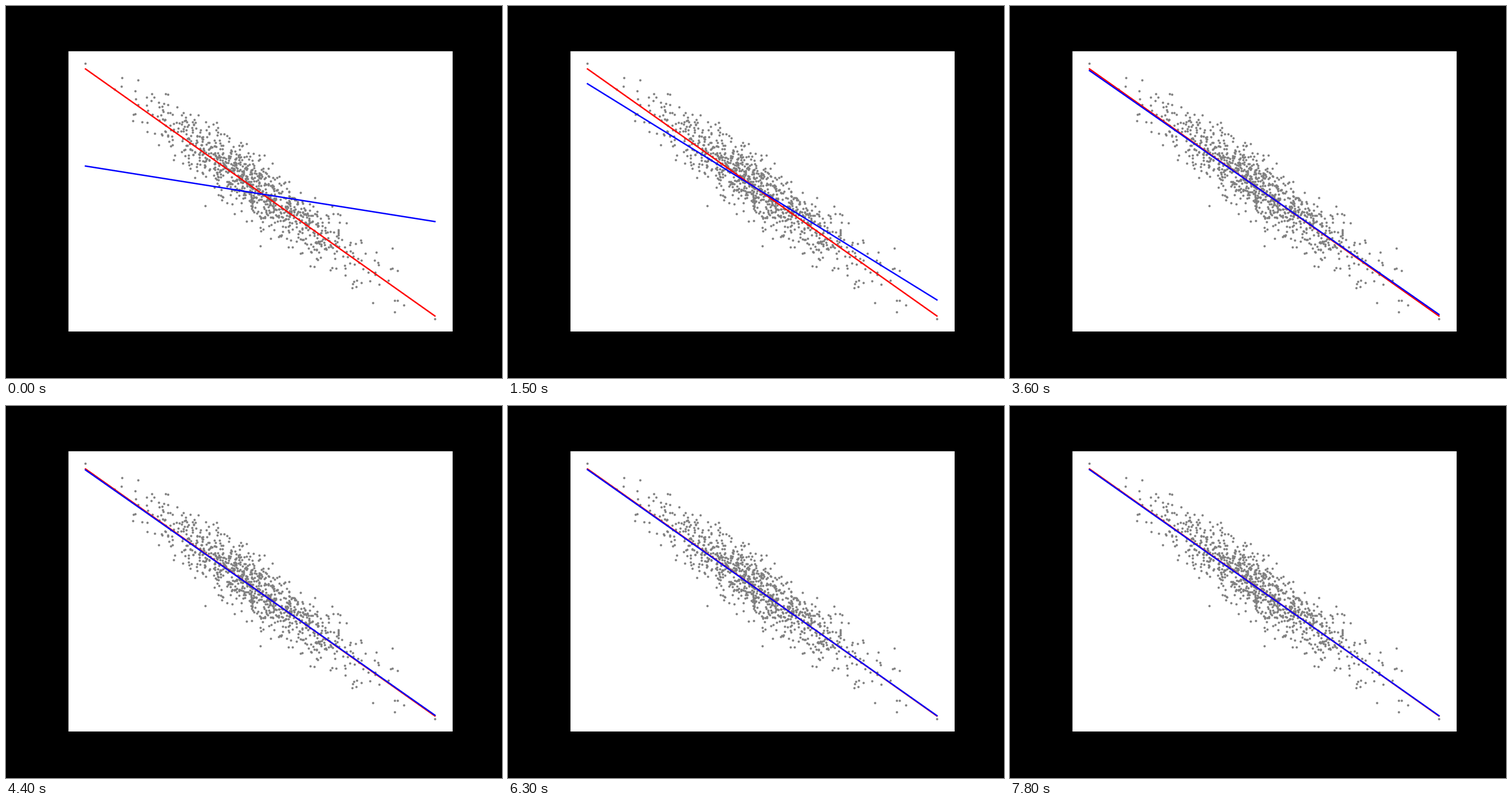
These frames come from a looping animation (864 px wide and 648 px high, 7.9 s). A matplotlib script:

```python
import numpy as np
import matplotlib.pyplot as plt
from matplotlib.animation import FuncAnimation

W, H, DPI = 864, 648, 72
FRAMES, STEP = 79, 100
LEFT, RIGHT, TOP, BOTTOM = 0.125 * W, 0.9 * W, 0.12 * H, 0.875 * H

# Line ends in pixels: 1/22 of the plot width in from each side
PAD = (RIGHT - LEFT) / 22
X = np.array([LEFT + PAD, RIGHT - PAD])
FIT = np.array([109.6, 540.0])

# Gap between the moving line and the fit at each end
GAP = np.array([168.0, -164.0])
RATE = np.array([1.28, 1.19])
REST = np.array([1.2, -0.5])

OUTLIERS = [(138.4, 100), (202, 125), (347, 348), (443.5, 418.5),
            (673.5, 422), (747.4, 545)]


def cloud(n, seed=7):
    """Normal scatter about the fitted line, without extreme values."""
    rng = np.random.default_rng(seed)
    z = rng.normal(size=(2 * n, 2))
    z = z[(np.abs(z) < [2.85, 2.6]).all(axis=1)][:n]
    x = 433 + 92 * z[:, 0]
    return x, np.interp(x, X, FIT) + 27 * z[:, 1]


def guess_y(t):
    return FIT + GAP * np.exp(-RATE * t) + REST


fig = plt.figure(figsize=(W / DPI, H / DPI), dpi=DPI, facecolor="black")
ax = fig.add_axes([LEFT / W, 1 - BOTTOM / H,
                   (RIGHT - LEFT) / W, (BOTTOM - TOP) / H])
ax.set(xlim=(LEFT, RIGHT), ylim=(BOTTOM, TOP), xticks=[], yticks=[])

for x, y in (cloud(980), np.transpose(OUTLIERS)):
    ax.plot(x, y, "o", color="gray", ms=3, mew=1, zorder=1)

ax.plot(X, FIT, color="red", lw=2.5, zorder=2)
guess, = ax.plot(X, guess_y(0), color="blue", lw=2.5, zorder=2.1)


def update(i):
    guess.set_ydata(guess_y(i * STEP / 1000))
    return guess,


anim = FuncAnimation(fig, update, frames=FRAMES, interval=STEP,
                     repeat=True, repeat_delay=0, blit=False)
plt.show()
```
